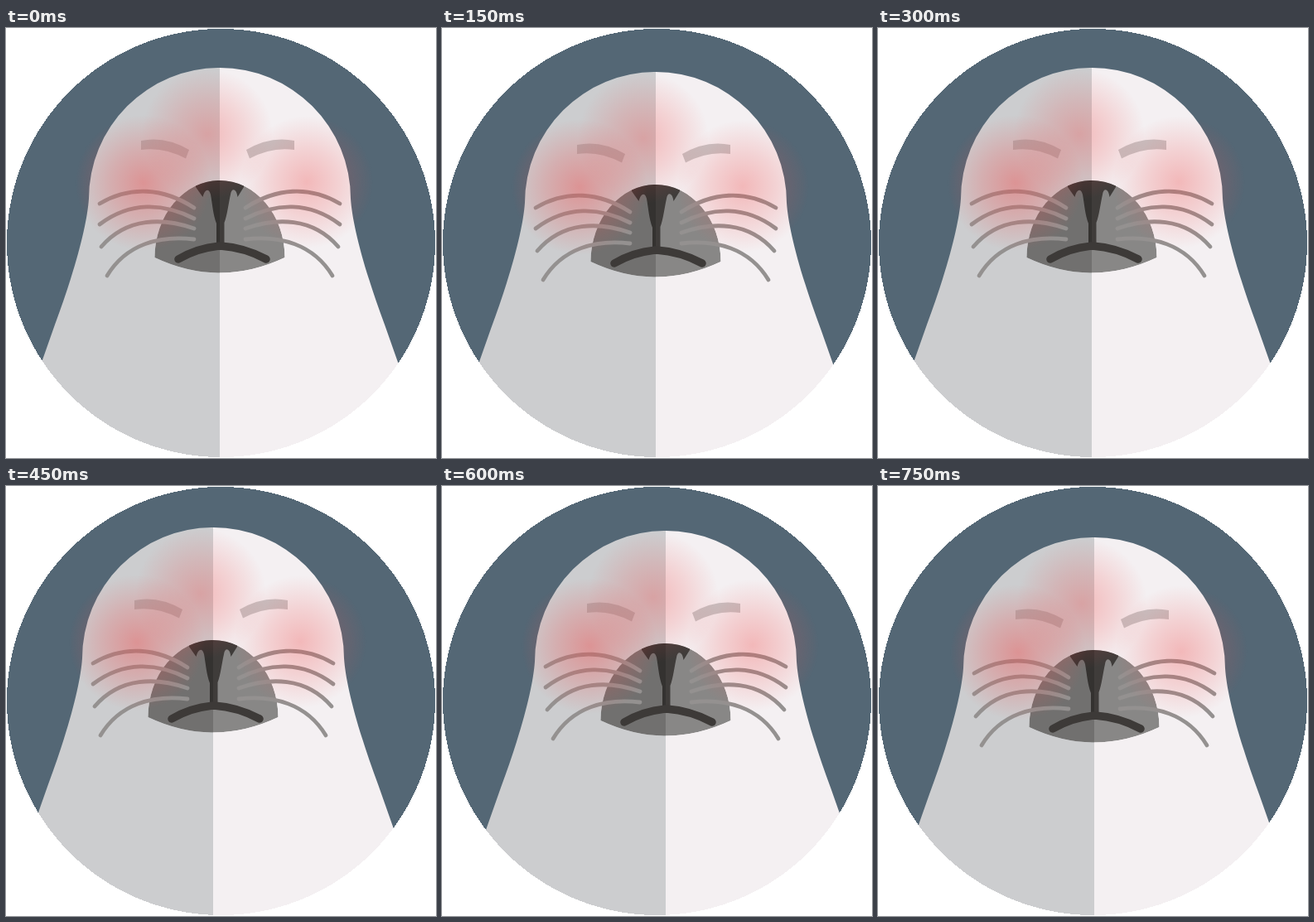
Animation of 519 by 519 pixels, one loop 900 ms. Source, as an HTML page:

```html
<!DOCTYPE html>
<html lang="en">
<head>
<meta charset="utf-8">
<title>Shivering seal</title>
<style>
  html, body { margin: 0; width: 100%; height: 100%; overflow: hidden; background: #fff; }
  svg { display: block; width: 100vw; height: 100vh; }
  .seal { animation: shiver 900ms step-end infinite; }
  @keyframes shiver {
    0%      { transform: translate(0, 0); }
    16.667% { transform: translate(0, 5px); }
    33.333% { transform: translate(0, 0); }
    50%     { transform: translate(-8px, 2px); }
    66.667% { transform: translate(12px, 6px); }
    83.333% { transform: translate(3px, 14px); }
  }
  .line { fill: none; stroke-linecap: round; }
</style>
</head>
<body>
<svg viewBox="0 0 519 519">
  <defs>
    <path id="noseShape" d="M179.500 277A78.500 93 0 0 1 336.500 277Q258 314 179.500 277Z"/>
    <clipPath id="nose"><use href="#noseShape"/></clipPath>
    <path id="half" d="M258 48A158 158 0 0 0 100 206C98 235 86 285 59 358L43.500 402L0 525V560H258Z"/>
    <g id="whiskers" class="line" stroke="#949190" stroke-width="4.800">
      <path d="M113 212C150 190 190 193 227 217"/>
      <path d="M113 237C150 209 190 211 227 230"/>
      <path d="M115 264C146 228 190 229 227 242"/>
      <path d="M122 299C145 261 185 250 227 255"/>
    </g>
    <path id="brow" d="M163 136Q192 130 221 147L217 157.500Q190 143 163 147Z" fill="#8a8686" fill-opacity=".44"/>
    <radialGradient id="blush">
      <stop offset="0" stop-color="#ef5050"/>
      <stop offset=".5" stop-color="#ef5050" stop-opacity=".53"/>
      <stop offset="1" stop-color="#ef5050" stop-opacity="0"/>
    </radialGradient>
  </defs>

  <rect width="519" height="519" fill="#546775"/>
  <g class="seal">
    <use href="#half" fill="#f4f0f2" transform="matrix(-1 0 0 1 516 0)"/>
    <use href="#half" fill="#cccdcf"/>

    <use href="#brow"/>
    <use href="#brow" transform="matrix(-1 0 0 1 511 0)"/>

    <g clip-path="url(#nose)">
      <use href="#noseShape" fill="#888786"/>
      <path d="M229 180H287V192L279.500 204C278 193 272 193 271 201C268.500 212 267 226 263.500 235L263.500 264H254V236C250 226 249 212 247 201C245 193 240 194 237.500 204L229 192Z" fill="#3f3c3a"/>
      <rect x="170" y="180" width="88" height="120" fill-opacity=".17"/>
    </g>
    <path class="line" d="M208 279Q232 265 259 263Q288 265 314 279" stroke="#3d3a38" stroke-width="9.500"/>

    <use href="#whiskers"/>
    <use href="#whiskers" transform="matrix(-1 0 0 1 516 0)"/>

    <g fill="url(#blush)">
      <circle cx="243" cy="128" r="79" opacity=".34"/>
      <circle cx="166" cy="187" r="82" opacity=".46"/>
      <circle cx="363" cy="186" r="80" opacity=".35"/>
    </g>
  </g>

  <!-- white surround that leaves the round window open -->
  <path d="M0 0H519V519H0ZM1 259.500A258.500 258.500 0 0 0 518 259.500A258.500 258.500 0 0 0 1 259.500Z"
        fill="#fff" fill-rule="evenodd" shape-rendering="crispEdges"/>
</svg>
</body>
</html>
```
